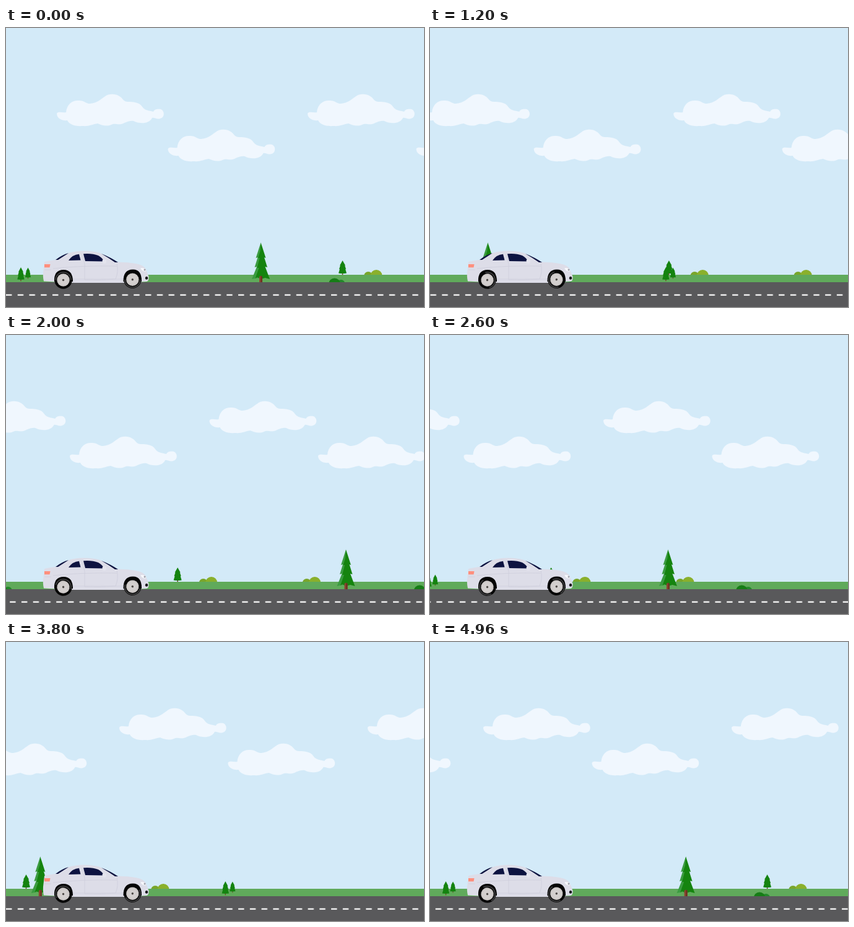
Animation, 675 px wide and 450 px high, one loop 5000 ms. Source, as an HTML page:

```html
<!DOCTYPE html>
<html lang="en">
<head>
<meta charset="utf-8">
<title>Drive</title>
<style>
  @property --k { syntax: "<number>"; inherits: true; initial-value: 0; }
  html, body { margin: 0; width: 100%; height: 100%; overflow: hidden; background: #d3eaf8; }
  svg { display: block; width: 675px; height: 450px; animation: drive 5s infinite; }

  /* --k counts 40 ms ticks; every layer moves a fixed distance per tick */
  @keyframes drive {
    0%   { --k: 0; animation-timing-function: step-end; }
    1.6% { --k: 1; animation-timing-function: steps(93, end); }
    76%  { --k: 94; animation-timing-function: steps(30, end); }
    100% { --k: 125; }
  }
  .sky  { transform: translateX(calc(var(--k) * -3.235px)); }
  .far  { transform: translateX(calc(var(--k) * -5.436px)); }
  .near { transform: translateX(calc(var(--k) * -10.97px)); }
  .spin { transform: rotate(calc(var(--k) * 15deg)); }
</style>
</head>
<body>
<svg viewBox="0 0 675 450">
  <defs>
    <path id="cloud" fill="#f0f7fe" d="M0 32C2 28 9 31 15 30C16 18 24 11 34 11C44 10 46 16 54 16C66 15 72 8 77 5C82 0 94-1 101 4C107 7 107 13 115 13C124 13 134 14 138 21C142 27 148 27 156 29C157 25 163 24 168 25C175 28 174 39 167 40C162 42 157 38 154 39C149 49 134 49 124 44C114 43 110 48 104 49C97 50 93 47 88 50C81 53 72 51 66 48C58 49 52 53 42 52C28 53 20 49 17 43C9 44 0 40 0 32Z"/>

    <g id="fir">
      <path fill="#6f4a2b" d="M-.8 19h1.600v4.500h-1.600z"/>
      <path fill="#14830f" d="M0 0L4.500 8H3.700L5.500 14H4.600L6.500 20.500Q0 21.500-6.500 20.500L-4.600 14H-5.500L-3.700 8H-4.500Z"/>
    </g>

    <g id="pine">
      <path fill="#3b9b41" d="M0 346L-8 371L-5 370L-10 386L-6.500 385L-14.500 405L0 402Z"/>
      <path fill="#15840f" d="M0 346L8 371L5.500 370L10.500 386L7 385L14.500 405L7 403L0 405L-6 402L-9 404L-3 387L-6 387L-2 371L-4.500 371L-1 360Z"/>
      <path fill="#8c4530" d="M-2.500 410.500V401L0 399.500L2.500 401V410.500Z"/>
      <path fill="#6b3322" d="M0 399.500L2.500 401V410.500H0Z"/>
    </g>

    <g id="shrub">
      <circle cx="7" cy="400" r="7" fill="#79a62b"/>
      <circle cx="20" cy="399.500" r="9.500" fill="#8ab02c"/>
    </g>

    <g id="farSet">
      <use href="#shrub" x="70"/>
      <use href="#fir" x="543.5" y="375"/>
      <use href="#shrub" x="578"/>
    </g>

    <g id="nearSet">
      <use href="#fir" transform="translate(24 386) scale(.88 .95)"/>
      <use href="#fir" transform="translate(35.500 386.500) scale(.72 .76)"/>
      <use href="#pine" x="411.500"/>
      <circle cx="541" cy="412.500" r="6.500" fill="#23882a"/>
      <circle cx="530.500" cy="413" r="9.500" fill="#167d16"/>
    </g>

    <g id="tyre">
      <circle r="14.200" fill="#050505"/>
      <path d="M-12.500 0A12.500 12.500 0 0 1 12.500 0" fill="none" stroke="#3a3a3b" stroke-width="2"/>
      <circle r="10.200" fill="#d3cfce"/>
      <circle r="8.800" fill="none" stroke="#c6c2c1" stroke-width=".8"/>
      <circle r="1.700" fill="#4b4745"/>
    </g>

    <pattern id="dash" width="18.750" height="5" patternUnits="userSpaceOnUse" y="428">
      <path fill="#fff" d="M0 1.500h9.400v2.200H0z"/>
    </pattern>
  </defs>

  <path fill="#d3eaf8" d="M0 0h675v450H0z"/>

  <g class="sky">
    <use href="#cloud" x="82" y="106"/>
    <use href="#cloud" x="487" y="106"/>
    <use href="#cloud" x="888" y="106"/>
    <use href="#cloud" x="261.500" y="163"/>
    <use href="#cloud" x="662.500" y="163"/>
  </g>

  <g class="far">
    <use href="#farSet"/>
    <use href="#farSet" x="675"/>
  </g>

  <path fill="#60aa5b" d="M0 398h675v12H0z"/>
  <g class="near">
    <use href="#nearSet"/>
    <use href="#nearSet" x="675"/>
    <use href="#nearSet" x="1361.500"/>
  </g>

  <path fill="#59595b" d="M0 410h675v40H0z"/>
  <path class="near" fill="url(#dash)" d="M0 428h2060v5H0z"/>

  <g id="car">
    <path fill="#dddde8" d="M62 377Q70 375 80 374Q92 366 101 363Q112 359.500 125 359.500Q142 359.500 152 363Q166 369 179 377.500Q206 378 217 382Q225 385 227 392L230.500 401Q231 408 227 409L190 411H110L61 408.500Q59 400 60.500 390Z"/>
    <g fill="#0d1340">
      <path d="M80 374Q90 366 101 363Q95 367 84 374Z"/>
      <path d="M101 375Q107 365.500 118 364.700L120.500 374.500Z"/>
      <path d="M125 364.200Q139 363 149 367Q156 371 158.500 376.500L128 376Z"/>
      <path d="M154 364Q169 370 181 378L176 378Q166 371 154 364Z"/>
    </g>
    <path fill="#e4e4ee" d="M155.500 375Q157 371.500 161 373Q163.500 376 160.500 380L156 379.500Z"/>
    <g fill="none" stroke="#cfcfdc" stroke-width=".8">
      <path d="M123 364L127 381V406Q150 407 177 405Q182 393 179 379"/>
      <path d="M76 388Q120 383 179 384M108 405H189M62 390H73"/>
    </g>
    <path fill="#ff8f7d" d="M62 381H71.500L70.500 386.300H62Z"/>
    <path fill="#f7f8fc" d="M217 387.500Q223 385.500 226.500 392Q221 394 217 387.500Z"/>
    <circle cx="224" cy="390" r="1.500" fill="#9fa3ac"/>
    <ellipse cx="227" cy="403.300" rx="2.200" ry="2.500" fill="#14141a"/>
    <path fill="#050505" d="M78 409Q77 390 93 390Q108 390 108 409ZM189.500 409Q189 389.500 205 389.500Q219.500 389.500 219 409Z"/>
  </g>
  <g transform="translate(92.500 406.500)"><use class="spin" href="#tyre"/></g>
  <g transform="translate(204.300 405.700) rotate(180)"><use class="spin" href="#tyre"/></g>
</svg>
</body>
</html>
```
